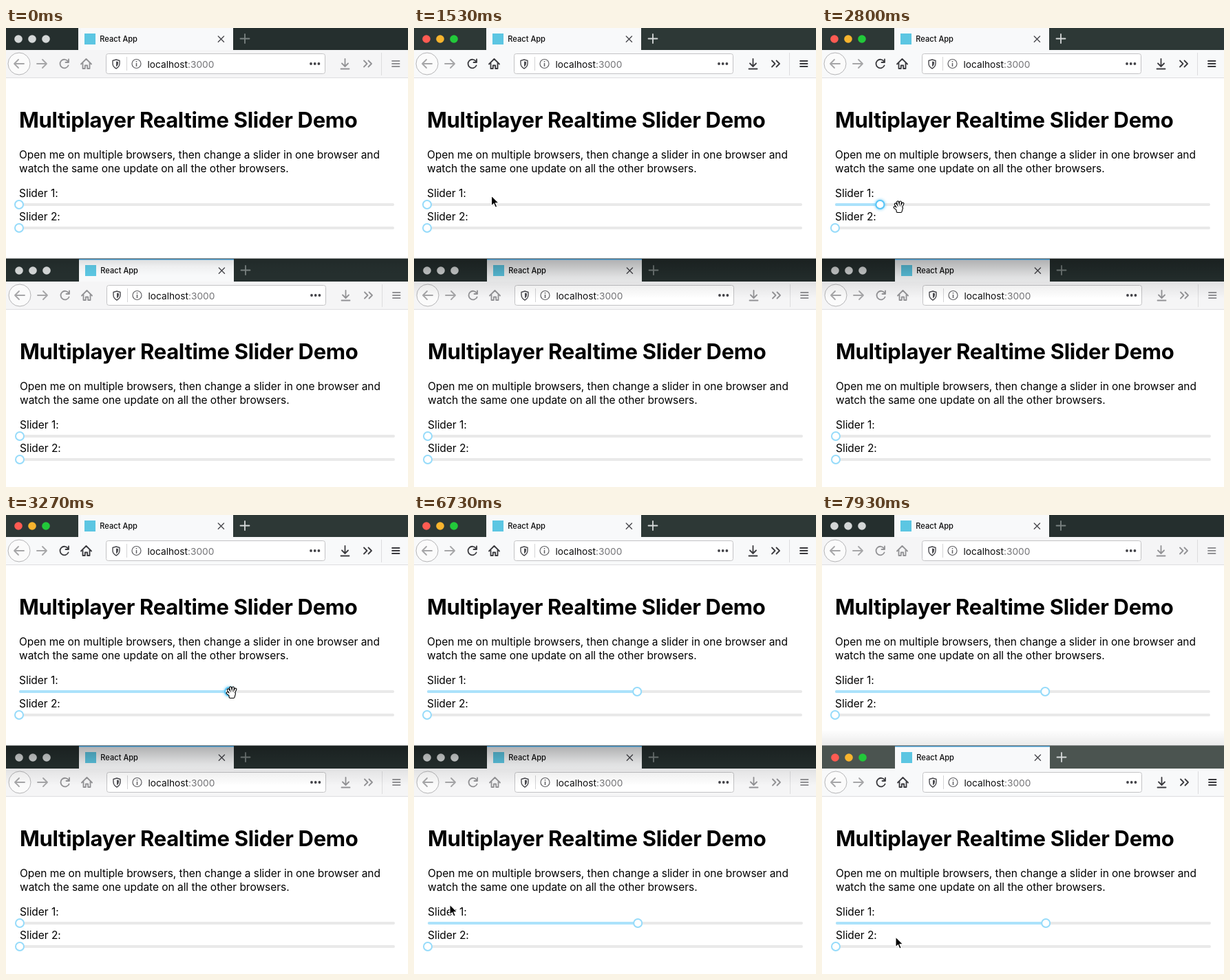
An HTML page for the animation above (8000 ms loop, 584x668 px).

```html
<!DOCTYPE html>
<html lang="en">
<head>
<meta charset="utf-8">
<title>Realtime sliders</title>
<style>
html, body { margin: 0; width: 100%; height: 100%; overflow: hidden; background: #fff; }
svg { display: block; font-family: Inter, Roboto, "Liberation Sans", sans-serif; font-optical-sizing: none; }
.icon { fill: none; stroke-width: 1.8; stroke-linecap: round; stroke-linejoin: round; }
.thin { stroke-width: 1.4; }
.dim { stroke: #a6a6a8; }
.dark { stroke: #4a4a4f; }
.copy { font-size: 15.5px; letter-spacing: -.036px; }
.thumb { fill: #fff; stroke: #96dbfa; stroke-width: 2; }
.thumb.hover { stroke: #57c5f7; }
.thumb.drag { stroke: #57c5f7; filter: drop-shadow(0 0 2px #57c5f7); }
</style>
</head>
<body>
<svg id="stage" width="584" height="668" viewBox="0 0 584 668">
  <defs>
    <linearGradient id="below" x2="0" y2="1">
      <stop stop-opacity=".3"/><stop offset=".45" stop-opacity=".1"/><stop offset="1" stop-opacity="0"/>
    </linearGradient>
    <linearGradient id="above" x2="0" y2="1">
      <stop stop-opacity="0"/><stop offset="1" stop-opacity=".08"/>
    </linearGradient>
    <path id="palm" d="M-1 3L-5.200-3.600M0 3L-1.900-6.600M1 3L1.900-6.600M2 3L5.400-4.400M-2 4.500L-6.400 1M-3 2H4L2.600 7H-2.400Z"/>
  </defs>
  <g id="windows"></g>
  <rect id="shadeBelow" y="336" width="584" fill="url(#below)"/>
  <rect id="shadeAbove" y="312" width="584" height="23" fill="url(#above)"/>
  <path d="M0 335.5H584" stroke="#858989"/>
  <path d="M106 336.900H331" stroke="#3f9fdc" stroke-width="1.200"/>
  <path id="arrow" d="M0 0V14.800L3.400 11.600 5.700 17 8.200 15.900 5.900 10.700H10.600Z" stroke="#fff" stroke-width="1.100"/>
  <g id="hand" fill="#fff" stroke-linejoin="round" stroke-linecap="round">
    <use href="#palm" stroke="#000" stroke-width="4"/>
    <use href="#palm" stroke="#fff" stroke-width="1.800"/>
  </g>
</svg>
<script>
const FPS = 15, FRAMES = 120;
const RAIL_START = 19, RAIL_LENGTH = 545;
const $ = id => document.getElementById(id);

const FOCUS_TOP = 17, HOVER = 29, DRAG = 36, DROP = 95, SYNC = 80, FOCUS_BOTTOM = 108;

// Pointer path: [tick, x, y]
const pointerPath = [
  [4, 575, 140], [6, 520, 162], [8, 420, 197], [10, 310, 226], [12, 225, 234], [14, 175, 230], [16, 157, 228],
  [19, 157, 228], [22, 130, 238], [24, 95, 250], [26, 60, 256], [28, 35, 257], [29, 28, 258], [30, 26, 258],
  [36, 26, 258], [38, 34, 258], [40, 64, 259], [42, 112, 260], [44, 172, 262], [46, 235, 264], [47, 282, 265],
  [48, 331, 266], [49, 328, 258], [94, 328, 258],
  [95, 318, 272], [97, 230, 385], [99, 120, 500], [101, 52, 567], [104, 28, 594], [107, 42, 608],
  [109, 46, 612], [113, 75, 622], [117, 103, 616], [119, 107, 614]
];

function pointerAt(tick) {
  const next = Math.max(1, pointerPath.findIndex(key => key[0] >= tick));
  const [t0, x0, y0] = pointerPath[next - 1], [t1, x1, y1] = pointerPath[next];
  const k = Math.max(0, (tick - t0) / (t1 - t0));
  return [x0 + (x1 - x0) * k, y0 + (y1 - y0) * k];
}

const slider = (name, label, y) => `
  <text class="copy" x="19" y="${y - 11}">${label}</text>
  <rect x="${RAIL_START}" y="${y - 2}" width="${RAIL_LENGTH}" height="4" rx="2" fill="#e9e9e9"/>
  <rect id="${name}Track" x="${RAIL_START}" y="${y - 2}" width="0" height="4" rx="2" fill="#abe2fb"/>
  <circle id="${name}Thumb" class="thumb" cx="${RAIL_START}" cy="${y}" r="6"/>`;

const browser = (name, x, y) => `
<g transform="translate(${x} ${y})">
  <rect x="-1" width="585" height="335" fill="#fff"/>
  <rect id="${name}Bar" x="-1" y="-1" width="585" height="33"/>
  ${[18, 38, 58].map((cx, i) => `<circle id="${name}Light${i}" cx="${cx}" cy="16" r="5.8"/>`).join('')}
  <rect x="105" width="225" height="33" fill="#f8f9fa"/>
  <rect x="114" y="8" width="16" height="16" fill="#5cc6e2"/>
  <text x="136.3" y="20" font-size="11.1" font-weight="500" fill="#0c0c0d">React App</text>
  <path class="icon thin dark" d="M308.3 12L316.500 20.200M316.500 12L308.300 20.200"/>
  <path id="${name}Plus" class="icon" d="M340.500 15.500H353.500M347 9V22"/>

  <rect id="${name}Tools" x="-1" y="32" width="585" height="40"/>
  <path d="M-1 72.500H584" stroke="#dedee0"/>
  <circle cx="19" cy="52" r="16" fill="#fbfbfb" stroke="#b5b5b7"/>
  <path class="icon dim" d="M26 52H12M18 46L12 52 18 58M45 52H59M53 46L59 52 53 58"/>
  <g id="${name}Icons" class="icon">
    <path d="M90 48.500A6.300 6.300 0 1 0 90.600 54.500M91 45.500V50H86.500"/>
    <path d="M109 52.500L116.500 45 124 52.500M111.500 51.500V59H114.800V54.500H118.200V59H121.500V51.500"/>
    <path d="M492.500 45V55.500M488 51.500L492.500 56 497 51.500M486.500 59.500H498.500"/>
    <path d="M520 47.500L524.500 52 520 56.500M526.500 47.500L531 52 526.500 56.500"/>
    <path d="M561 48H571.500M561 52H571.500M561 56H571.500"/>
  </g>
  <path d="M545.500 36V69" stroke="#dcdcde"/>
  <rect x="145.500" y="37.500" width="318" height="29" rx="3" fill="#fff" stroke="#c3c3c5"/>
  <path class="icon thin dark" d="M160 46L165 47.500V51.500C165 55 163 57.500 160 59 157 57.500 155 55 155 51.500V47.500Z"/>
  <path d="M160 48.500V56.500C162 55 163 53.500 163 51V49.300Z" fill="#4a4a4f"/>
  <path d="M175.500 42V62" stroke="#d3d3d5"/>
  <circle cx="189.500" cy="52" r="6.500" fill="none" stroke="#606064" stroke-width="1.200"/>
  <path d="M189.500 51V56M189.500 48V49.500" stroke="#606064" stroke-width="1.500"/>
  <text x="205.500" y="57.500" font-size="13.700" fill="#0c0c0d">localhost<tspan fill="#737376">:3000</tspan></text>
  ${[443, 448.7, 454.4].map(cx => `<circle cx="${cx}" cy="52" r="1.9" fill="#424247"/>`).join('')}

  <text x="19" y="145" font-size="31" font-weight="700" letter-spacing="-.31">Multiplayer Realtime Slider Demo</text>
  <text class="copy" x="19" y="190">Open me on multiple browsers, then change a slider in one browser and</text>
  <text class="copy" x="19" y="210">watch the same one update on all the other browsers.</text>
  ${slider(name + 'One', 'Slider 1:', 257)}
  ${slider(name + 'Two', 'Slider 2:', 291)}
</g>`;

$('windows').innerHTML = browser('top', 0, 0) + browser('bottom', 1, 337);

function setFocus(name, focused, barColor) {
  const lights = focused ? ['#ff5b52', '#f8b42e', '#22c93a'] : Array(3).fill('#d4d7d7');
  lights.forEach((color, i) => $(name + 'Light' + i).setAttribute('fill', color));
  $(name + 'Bar').setAttribute('fill', barColor);
  $(name + 'Plus').setAttribute('stroke', focused ? '#d6d9d9' : '#7b8382');
  $(name + 'Tools').setAttribute('fill', focused ? '#f8f9fa' : '#f5f5f6');
  $(name + 'Icons').setAttribute('stroke', focused ? '#3a3a3e' : '#929295');
}

function setSlider(name, percent, state = '') {
  const width = RAIL_LENGTH * percent / 100;
  $(name + 'Track').setAttribute('width', width);
  $(name + 'Thumb').setAttribute('cx', RAIL_START + width);
  $(name + 'Thumb').setAttribute('class', 'thumb ' + state);
}

function place(id, shown, [x, y]) {
  $(id).setAttribute('visibility', shown ? 'visible' : 'hidden');
  $(id).setAttribute('transform', `translate(${x} ${y})`);
}

// The slider trails the pointer by one tick and snaps to whole percents.
function sliderValue(tick) {
  if (tick <= DRAG) return 0;
  const [x] = pointerAt(Math.min(tick, 50) - 1);
  return Math.max(0, Math.floor((x - 22) / RAIL_LENGTH * 100));
}

function render(ms) {
  const tick = Math.floor((ms + 4) * FPS / 1000) % FRAMES;
  const topFocused = tick >= FOCUS_TOP && tick < FOCUS_BOTTOM;
  const bottomFocused = tick >= FOCUS_BOTTOM;
  const overThumb = tick >= HOVER && tick < DROP;

  setFocus('top', topFocused, topFocused ? '#2d3836' : '#252f2e');
  setFocus('bottom', bottomFocused, bottomFocused ? '#4b5450' : '#252f2e');
  $('shadeBelow').setAttribute('height', topFocused ? 58 : 24);
  $('shadeBelow').setAttribute('opacity', bottomFocused ? 0 : topFocused ? 1 : .4);
  $('shadeAbove').setAttribute('opacity', bottomFocused ? 1 : 0);

  setSlider('topOne', sliderValue(tick), !overThumb ? '' : tick < DRAG ? 'hover' : 'drag');
  setSlider('bottomOne', tick >= SYNC ? 56 : 0);

  const pointer = pointerAt(tick);
  place('arrow', tick >= 4 && !overThumb, pointer);
  place('hand', overThumb, pointer);
}

const start = performance.now();
function loop() {
  render((performance.now() - start) % 8000);
  requestAnimationFrame(loop);
}
loop();
</script>
</body>
</html>
```
